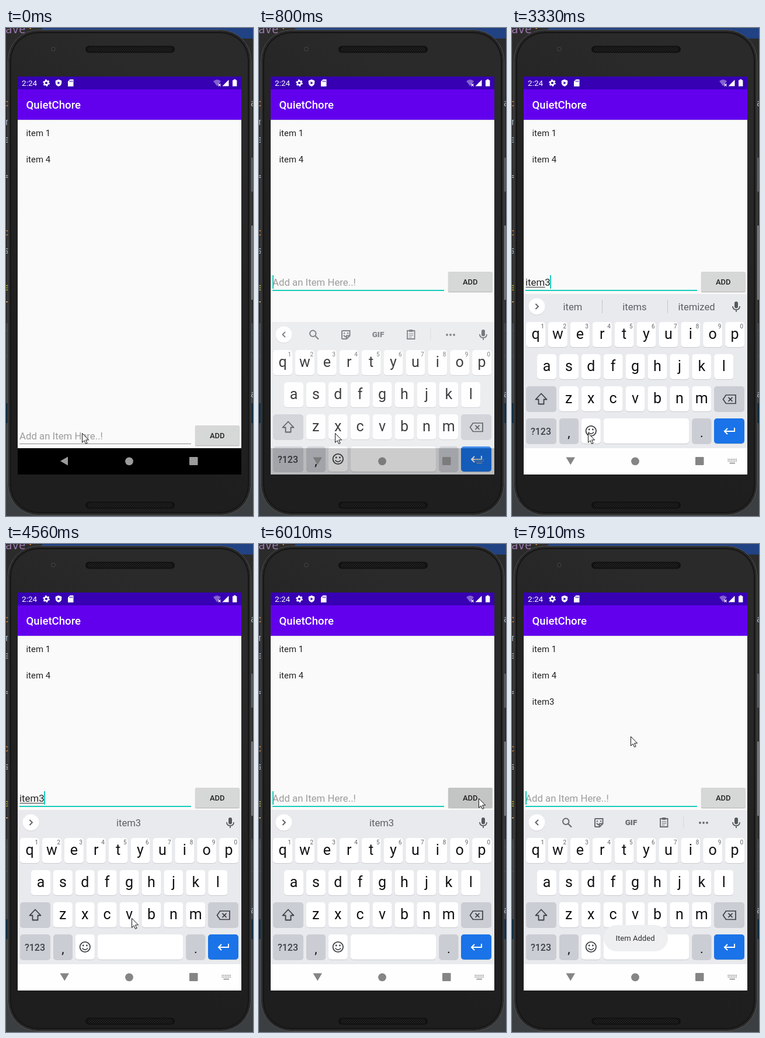
Write an HTML page that moves like this. It is 423x835 px and loops after 8000 ms.

```html
<!DOCTYPE html>
<html lang="en">
<head>
<meta charset="utf-8">
<title>To-do list demo</title>
<style>
  html, body { margin: 0; width: 100%; height: 100%; overflow: hidden; background: #2b2b2b; }
  svg { display: block; width: 100%; height: 100%; }
  text { font-family: Roboto, "Open Sans", sans-serif; white-space: pre; }
  .code { font-family: "DejaVu Sans Mono", monospace; }
</style>
</head>
<body>
<svg id="stage" viewBox="0 0 423 835"></svg>
<script>
const LOOP = 8000;
const FIELD_FONT = 16.8;

// ---- markup helpers ----
const rect = (x, y, w, h, fill, r = 0, more = '') =>
  `<rect x="${x}" y="${y}" width="${w}" height="${h}" rx="${r}" fill="${fill}" ${more}/>`;
const circle = (x, y, r, fill, more = '') => `<circle cx="${x}" cy="${y}" r="${r}" fill="${fill}" ${more}/>`;
const path = (d, fill, more = '') => `<path d="${d}" fill="${fill}" ${more}/>`;
const line = (d, color, w = 1.8, more = '') => path(d, 'none', `stroke="${color}" stroke-width="${w}" ${more}`);
const text = (s, x, y, size, fill, more = '') =>
  `<text x="${x}" y="${y}" font-size="${size}" fill="${fill}" ${more}>${s}</text>`;
const mid = (s, x, y, size, fill, more = '') => text(s, x, y, size, fill, 'text-anchor="middle" ' + more);
const group = (id, body, more = '') => `<g id="${id}" ${more}>${body}</g>`;

// ---- surroundings and phone ----
function editor() {
  const bits = [
    ['o', 134, '#cc7832'], ['m', 166, '#a9b7c6'], ['e', 196, '#a9b7c6'], ['=', 259, '#a9b7c6'],
    ['o', 355, '#cc7832'], ['s', 386, '#a9b7c6'], ['e', 449, '#bbb529'], ['-', 473, '#ffc66d']
  ];
  return rect(0, 0, 423, 835, '#2b2b2b') + rect(62, 0, 361, 18, '#214283') +
    rect(0, 505, 423, 330, '#3c3f41') + rect(0, 517, 423, 1, '#4b4e50') + rect(0, 560, 423, 1, '#4b4e50') +
    rect(0, 642, 423, 34, '#0d293e') +
    text('ave', -1, 9, 19, '#9876aa', 'class="code"') + text(':', 36, 9, 19, '#cc7832', 'class="code"') +
    bits.map(([s, y, c]) => text(s, -4, y, 16, c, 'class="code"')).join('') +
    rect(420, 222, 3, 58, '#55585a') + rect(420, 338, 3, 127, '#707274') +
    text('a', 419, 134, 15, '#a9b7c6', 'class="code"') + text('a', 419, 632, 15, '#a9b7c6', 'class="code"');
}

const speaker = y => rect(136, y, 153, 12, '#111', 6) +
  rect(140, y + 2, 145, 8, 'url(#mesh)', 4);

const phone = () =>
  rect(3.5, 3.5, 416, 830, '#151515', 52, 'stroke="#5a5a5a"') +
  rect(5.5, 5.5, 412, 826, '#191919', 50, 'stroke="#3d3d3d"') +
  rect(8.5, 8.5, 406, 820, 'url(#body)', 47, 'stroke="#161616"') +
  circle(81, 36, 4, '#383838') + circle(81, 36, 2, '#222') + speaker(30.5) + speaker(810.5);

function bars() {
  const w = '#fff';
  return rect(20, 83, 383, 22, '#3700b3') + rect(20, 105, 383, 52, '#6200ee') + rect(20, 157, 383, 1, '#dcd8e2') +
    text('2:24', 27, 99, 13.6, w) +
    circle(69, 94, 3.3, 'none', `stroke="${w}" stroke-width="2.4"`) +
    circle(69, 94, 5, 'none', `stroke="${w}" stroke-width="1.8" stroke-dasharray="2.6 2.636"`) +
    path('M90 88l5.2 2v3.8c0 3.2-2.2 5.2-5.2 6.3c-3-1.1-5.2-3.1-5.2-6.3v-3.8z', w) +
    path('M88.5 91.4l4.2 2.5l-4.2 2.5z', '#3700b3') +
    path('M109.5 88h6v12h-9.5v-8.5z', w) + line('M109.4 90v2.4M111.5 90v2.4M113.6 90v2.4', '#3700b3', 1) +
    path('M355 91q6.5-5.5 13 0l-6.5 8.5z', w, 'opacity=".38"') + line('M363.5 95.5l4 4m0-4l-4 4', w, 1.2) +
    path('M370.5 99.5h11v-11z', w) +
    path('M388 89.2h2v-1.4h3.4v1.4h2v10.6h-7.4z', w) +
    text('QuietChore', 34.5, 138, 18.6, w, 'font-weight="500"');
}

// ---- keyboard ----
const key = (x, y, w, fill = '#fff') => rect(x, y + 1, w, 43, '#c9cbd0', 5) + rect(x, y, w, 43, fill, 5);

function letterRow(letters, x, y, digits) {
  return [...letters].map((c, i) => {
    const cx = x + i * 37.9;
    return key(cx - 16.5, y, 33) + mid(c, cx, y + 29, 25, '#111') +
      (digits ? mid((i + 1) % 10, cx + 11.8, y + 11, 10, '#5f6368') : '');
  }).join('');
}

function keys() {
  const gray = '#cbcdd4', ink = '#3c4043';
  return letterRow('qwertyuiop', 40.5, 503, true) + letterRow('asdfghjkl', 59.5, 558) +
    letterRow('zxcvbnm', 97.3, 613) +
    key(24, 613, 52, gray) + line('M50 625.5l-9.5 10h5v8h9v-8h5z', ink, 1.8, 'stroke-linejoin="round"') +
    key(346, 613, 52, gray) +
    line('M366.5 628h16.5v14.5h-16.5l-5-7.2zM370.5 631.8l7 7m0-7l-7 7', ink, 1.7) +
    key(24, 668, 52, gray) + mid('?123', 49.5, 695.5, 16, ink, 'font-weight="500"') +
    key(81, 668, 33, gray) + mid(',', 97.5, 700, 22, '#111') +
    key(118.8, 668, 33) + circle(135.3, 689.5, 8.7, 'none', `stroke="${ink}" stroke-width="1.8"`) +
    circle(132.2, 687, 1.4, ink) + circle(138.4, 687, 1.4, ink) + line('M130.5 691.5q4.8 5.6 9.6 0', ink, 1.7) +
    key(157, 668, 146) +
    key(308.3, 668, 33, gray) + mid('.', 324.8, 700, 22, '#111') +
    key(346, 668, 52, '#1a73e8') + line('M381 684v6h-16.5M369 685l-5 5l5 5', '#fff', 2);
}

const pill = d => circle(42.5, 477.5, 14, '#d0d2d5') + circle(42.5, 476.5, 14, '#fff') + line(d, '#5f6368', 1.9);

function toolStrip() {
  const c = '#666a6f';
  return pill('M45 472l-4.6 4.5l4.6 4.5') +
    circle(92.3, 474.8, 5.2, 'none', `stroke="${c}" stroke-width="2"`) + line('M96 478.5l6 6', c, 2.2) +
    line('M143 470h12.5v8.5l-5.5 5.5h-7q-1 0-1-1v-12q0-1 1-1zM155.5 478.5h-5.5v5.5M145 477.5q2 3.4 4.8 2.8', c, 2) +
    circle(146, 474.3, 1.2, c) + circle(152, 474.3, 1.2, c) +
    mid('GIF', 204, 481.3, 13.5, c, 'font-weight="900"') +
    line('M254 470h12.5v14h-12.5z', c, 1.8) + rect(257, 468, 6.5, 4, c, 1) +
    line('M256.5 475h7.5M256.5 478h7.5M256.5 481h5', c, 1.2) +
    rect(293.5, 466, 1, 21, '#d4d6da') +
    [322, 328, 334].map(x => circle(x, 477, 1.9, c)).join('');
}

function wordStrip() {
  return pill('M40.4 472l4.6 4.5l-4.6 4.5') +
    [104, 210, 316].map((x, i) => mid('', x, 483, 16.6, '#5b5f64', `id="word${i}"`)).join('') +
    group('dividers', rect(154, 465, 1, 23, '#c3c5c9') + rect(266, 465, 1, 23, '#c3c5c9'));
}

const mic = () => rect(381, 468, 6, 11.5, '#55595e', 3) +
  line('M378 476q0 6 6 6q6 0 6-6M384 482v4', '#55595e', 1.7);

const keyboard = () => rect(20, 455, 383, 264, '#e8eaed') + rect(20, 719, 383, 45, '#fefefe') +
  group('tools', toolStrip()) + group('words', wordStrip()) + mic() + keys();

const navIcons = () =>
  path('M93 741l13-7.5v15z', 'currentColor', 'id="back"') +
  path('M92.5 734.5h15.5l-7.7 13z', 'currentColor', 'id="hide"') +
  circle(211, 741.3, 6.9, 'currentColor') + rect(314, 734, 14.5, 14, 'currentColor', 1) +
  group('switcher', line('M369.5 738h15.5M369.5 741h15.5', 'currentColor', 1.6, 'stroke-dasharray="1.7 1.05"') +
    line('M372.5 744.5h9.5', 'currentColor', 1.6));

// The field is laid out at its raised position.
const field = () =>
  text('Add an Item Here..!', 23, 441, FIELD_FONT, '#9c9c9c', 'id="hint"') +
  text('', 23, 441, FIELD_FONT, '#222', 'id="typed"') +
  rect(23.5, 443, 0, 1, '#333', 0, 'id="composing"') +
  rect(23, 448, 294, 1, '#8c8c8c', 0, 'id="base"') +
  rect(23, 423, 2, 23, '#17cdb9', 0, 'id="caret"') +
  rect(323.5, 418, 76.5, 35, '#000', 2, 'opacity=".1"') + rect(324, 417.5, 75.5, 34.5, '#bdbdbd', 2) +
  rect(324, 417, 75.5, 34, '#d6d7d7', 2) + rect(324, 417, 75.5, 34, '#000', 2, 'id="press"') +
  mid('ADD', 361.8, 438.8, 13, '#222', 'font-weight="500"');

const toast = () => rect(157, 652, 110, 45, '#eeeff0', 22.5) + mid('Item Added', 211, 679, 13.1, '#333');

const row = (s, y, more) => text(s, 34.5, y, 14.9, '#222', more);

document.getElementById('stage').innerHTML = `<defs>
  <linearGradient id="body" x1=".35" y1="0" x2="0" y2="1">
    <stop offset="0" stop-color="#2a2a2a"/><stop offset=".3" stop-color="#232323"/><stop offset=".7" stop-color="#1e1e1e"/>
  </linearGradient>
  <pattern id="mesh" width="4" height="4" patternUnits="userSpaceOnUse">
    ${circle(1, 1, 0.8, '#333')}${circle(3, 3, 0.8, '#333')}
  </pattern>
  <clipPath id="screen">${rect(20, 83, 383, 681, '#fff')}</clipPath></defs>` +
  editor() + phone() +
  group('display', rect(20, 83, 383, 681, '#fafafa') + bars() + rect(20, 719, 383, 45, '#000') +
    row('item 1', 185) + row('item 4', 230) + row('item3', 274.5, 'id="added"') +
    group('field', field()) + group('keyboard', keyboard()) + group('nav', navIcons()) + group('toast', toast()),
    'clip-path="url(#screen)"') +
  group('mouse', path('M.5 .5v15.8l3.6-3.4l2.5 5.6l2.5-1.1l-2.5-5.5h5z', '#fff', 'stroke="#111"'));

// ---- timeline: [start, value], held until the next entry ----
const at = (t, steps) => steps.reduce((v, [start, x]) => t >= start ? x : v, steps[0][1]);

const CARET = [[0, 0], [260, 1], [920, 0], [1380, 1], [3210, 0], [3330, 1], [4020, 0], [4560, 1],
  [5070, 0], [5470, 1], [6550, 0], [6960, 1], [7510, 0], [7790, 1]];
const TYPED = [[0, ''], [1530, 'i'], [1840, 'it'], [2230, 'ite'], [2540, 'item'], [3330, 'item3'], [6010, '']];
const COMPOSING = [[0, ''], [1840, 'i'], [2110, 'it'], [2380, 'ite'], [2690, 'item'], [3610, 'item3'], [6010, '']];
const WORDS = [[0, null], [1840, ['i', 'I', "I'm"]], [2110, ['it', 'It', "it's"]], [2380, ['ite', 'item', 'its']],
  [2690, ['item', 'items', 'itemized']], [3610, ['', 'item3', '']], [6160, null]];
const SLIDE = [[0, [309, 0]], [650, [173, 0.36]], [800, [48, 0.8]], [920, [0, 1]]];
const PRESS = [[0, 0], [5770, 0.04], [5890, 0.09], [6160, 0.05], [6280, 0]];
const TOAST = [[0, 0], [6160, 0.2], [6280, 0.55], [6400, 0.85], [6550, 1]];
const MOUSE = [[0, [130, 693]], [4560, [215, 640]], [4680, [330, 570]], [4800, [405, 520]], [4920, [417, 490]],
  [5070, [407, 461]], [5190, [399, 449]], [5310, [387, 437]], [5470, [376, 435]], [7790, [300, 392]], [7910, [203, 329]]];

const el = {};
document.querySelectorAll('#stage [id]').forEach(e => el[e.id] = e);
const set = (id, name, value) => el[id].setAttribute(name, value);
const show = (id, on) => set(id, 'visibility', on ? 'visible' : 'hidden');

const pen = document.createElement('canvas').getContext('2d');
const width = s => {
  pen.font = `${FIELD_FONT}px Roboto, "Open Sans", sans-serif`;
  return pen.measureText(s).width;
};

function render(t) {
  const typed = at(t, TYPED), words = at(t, WORDS), focused = t >= 260;
  const [drop, alpha] = at(t, SLIDE);

  set('field', 'transform', `translate(0 ${t < 650 ? 263 : 0})`);
  show('hint', !typed);
  el.typed.textContent = typed;
  set('composing', 'width', width(at(t, COMPOSING)));
  set('base', 'fill', focused ? '#17cdb9' : '#8c8c8c');
  set('base', 'height', focused ? 2 : 1);
  set('caret', 'x', 23 + Math.floor(width(typed)));
  show('caret', at(t, CARET));
  set('press', 'opacity', at(t, PRESS));

  set('keyboard', 'transform', `translate(0 ${drop})`);
  set('keyboard', 'opacity', alpha);
  show('tools', !words);
  show('words', words);
  // Child visibility overrides the group's, so it follows the strip too.
  show('dividers', words && words[0]);
  (words || ['', '', '']).forEach((w, i) => el['word' + i].textContent = w);

  set('nav', 'color', t < 650 ? '#9c9c9c' : t < 920 ? '#7c7c7c' : '#858585');
  show('back', t < 800);
  show('hide', t >= 800);
  show('switcher', t >= 510);

  show('added', t >= 6160);
  set('toast', 'opacity', at(t, TOAST));
  set('mouse', 'transform', `translate(${at(t, MOUSE)})`);
}

const start = performance.now();
function tick() {
  render((performance.now() - start) % LOOP);
  requestAnimationFrame(tick);
}
tick();
</script>
</body>
</html>
```
